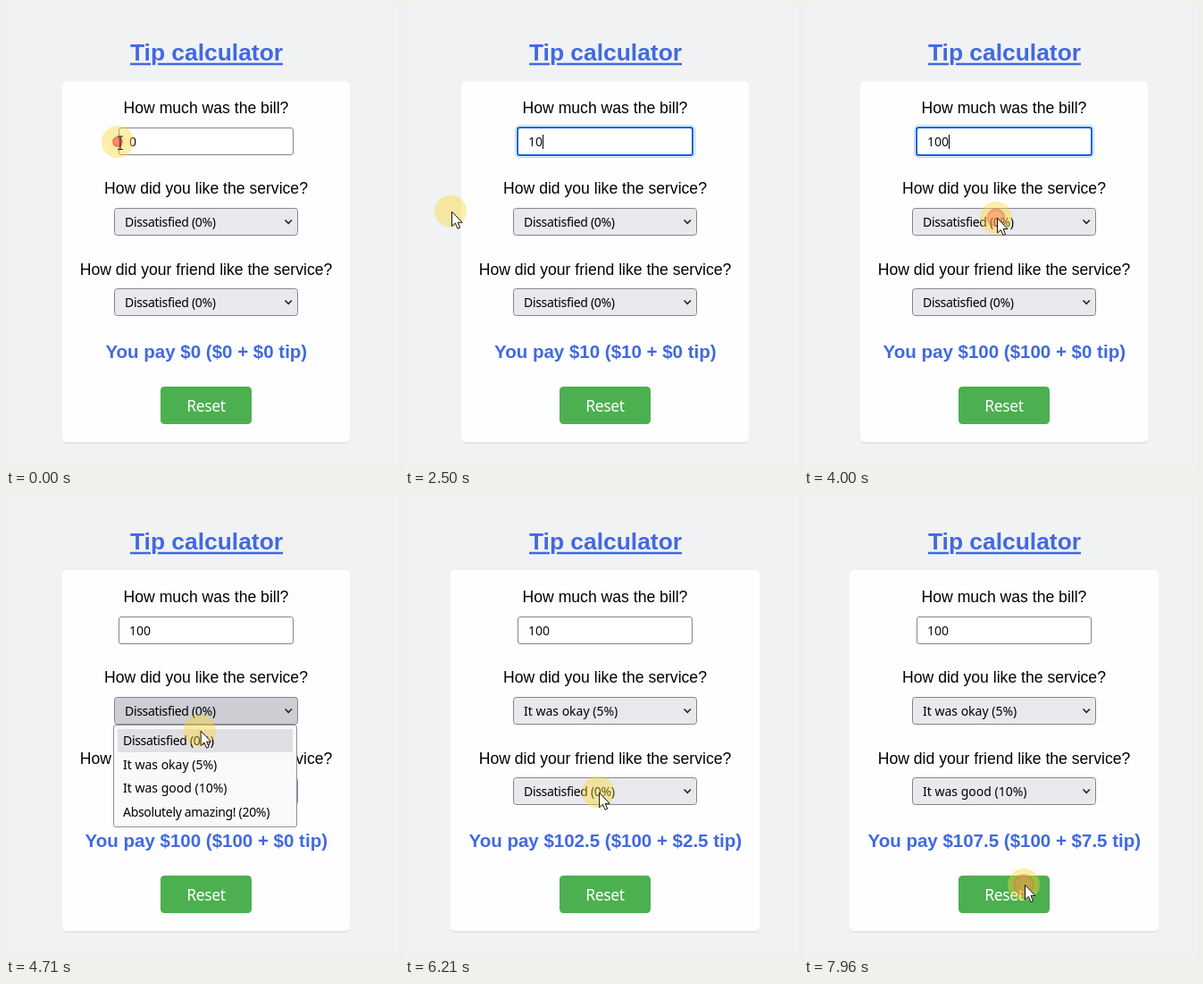
These frames come from a looping animation (440 px wide and 516 px high, 8000 ms). An HTML page:

```html
<!DOCTYPE html>
<html lang="en">
<head>
<meta charset="utf-8">
<title>Tip calculator</title>
<style>
  html, body { margin: 0; width: 100%; height: 100%; overflow: hidden; background: #f1f2f3; }
  svg { display: block; width: 440px; height: 516px; }
  text { white-space: pre; }
  .head { font: bold 26.4px "Liberation Sans", Arial, sans-serif; fill: #4169e1; text-anchor: middle; }
  .label { font: 17.6px "Liberation Sans", Arial, sans-serif; text-anchor: middle; }
  .total { font: bold 20.5px "Liberation Sans", Arial, sans-serif; fill: #4169e1; text-anchor: middle; }
  .ui { font: 14px "Noto Sans", "Open Sans", sans-serif; }
  .tight { letter-spacing: -.32px; }
  .btn { font-size: 17.5px; fill: #fff; text-anchor: middle; }
</style>
</head>
<body>
<svg id="stage" viewBox="0 0 440 516" xmlns="http://www.w3.org/2000/svg"></svg>
<script>
const LOOP = 8000;
const OPTIONS = [
  { text: "Dissatisfied (0%)", tip: 0, tight: true },
  { text: "It was okay (5%)", tip: 5 },
  { text: "It was good (10%)", tip: 10 },
  { text: "Absolutely amazing! (20%)", tip: 20, tight: true }
];
const ROW = 26.67;
const LAST_KEY = 2520;
const BLUR = 4060;
const CLICK_TIME = 180;
const BLUE = "#0060df", FACE = "#e9e9ed", PRESSED = "#cdcdd4", EDGE = "#84848e";

// Pointer stops: time, x, y
const PATH = [
  [0, 125, 152], [90, 125, 152], [880, 80, 151], [1090, 75, 149],
  [1850, 75, 149], [2200, 51, 215], [2740, 51, 240], [3090, 170, 387],
  [3250, 182, 380], [3800, 215, 237], [4420, 215, 237], [5090, 219, 303],
  [5560, 219, 303], [6300, 216, 334], [6850, 216, 334], [7000, 220, 422],
  [7480, 220, 422], [7800, 246, 436], [8000, 246, 436]
];
const CLICKS = [-20, 3925, 5175, 6450, 7260, 7870];
const MENUS = [
  { top: 226, open: 4080, close: 5400, pick: 1 },
  { top: 316, open: 6600, close: 7440, pick: 2 }
];
// Text areas that show the I-beam: left, top, right, bottom
const TEXT_AREAS = [
  [126, 136, 322, 167], [132, 105, 316, 124], [110, 195, 338, 214],
  [83, 286, 365, 305], [88, 376, 360, 398]
];

const stage = document.getElementById("stage");

function add(tag, attrs, parent = stage, text) {
  const el = document.createElementNS("http://www.w3.org/2000/svg", tag);
  set(el, attrs);
  if (text) el.textContent = text;
  parent.appendChild(el);
  return el;
}
function set(el, attrs) {
  for (const k in attrs) el.setAttribute(k, attrs[k]);
}
function show(el, on) {
  el.setAttribute("visibility", on ? "visible" : "hidden");
}
function box(x, y, width, height, rx, fill, stroke = "none", parent = stage) {
  return add("rect", { x, y, width, height, rx, fill, stroke }, parent);
}
function label(cls, x, y, text, parent = stage) {
  return add("text", { class: cls, x, y }, parent, text);
}
const optionClass = o => o.tight ? "ui tight" : "ui";

// Page
label("head", 224.5, 61, "Tip calculator");
add("path", { d: "M139 65H162M170 65H310", stroke: "#4169e1", "stroke-width": 2.6 });
const shadow = box(0, 85, 0, 405, 5, "rgba(40,40,60,.06)");
const card = box(0, 84, 0, 404, 5, "#fefefe");
label("label", 224, 120, "How much was the bill?");
label("label", 224, 210, "How did you like the service?");
label("label", 224, 301, "How did your friend like the service?");

// Bill field
const plain = box(126.5, 136.5, 195, 30, 2.5, "#fff", EDGE);
const focus = add("g", {});
box(123.5, 133.5, 201, 36, 5, "none", "#b0d2ee", focus);
set(box(126, 136, 196, 31, 2.5, "#fff", BLUE, focus), { "stroke-width": 2 });
const mark = box(138, 143, 8, 17, 0, "#0078d7");
const bill = label("ui", 138, 157, "0");
const caret = box(162, 144, 1, 16, 0, "#000");

// Service choices
const selects = MENUS.map(m => ({
  face: box(121.5, m.top + .5, 205, 30, 3, FACE, EDGE),
  text: label("ui", 133, m.top + 21, ""),
  arrow: add("path", {
    d: `M312.5 ${m.top + 13.5}l3.7 3.8l3.7 -3.8`,
    fill: "none", stroke: "#222", "stroke-width": 1.6
  })
}));

const total = label("total", 224.3, 394, "");
box(173, 426, 102, 42, 4.5, "#4caf50");
label("ui tight btn", 224, 454, "Reset");

const lists = MENUS.map((m, i) => {
  const g = add("g", {});
  const top = m.top + 31 + i;
  box(120.5, top + .5, 205, 114, 2.5, "#f9f9fb", "#8f8f9d", g);
  const row = box(125, 0, 196, 26, 0, "#dfdfe4", "none", g);
  OPTIONS.forEach((o, n) => label(optionClass(o), 131, top + 23 + n * ROW, o.text, g));
  return { g, row, top };
});

// Pointer
const pointer = add("g", {});
add("circle", { r: 18, fill: "rgba(250,215,50,.42)" }, pointer);
const ring = add("circle", { "stroke-width": 2 }, pointer);
const arrow = add("path", {
  d: "M1.5 .5V17L5.3 13.5L8 19.6L10.6 18.4L8 12.6H13Z",
  fill: "#fff", stroke: "#111", "stroke-width": 1
}, pointer);
const beam = add("path", {
  d: "M0 -6H2.5L3 -5.5L3.5 -6H6M3 -5.5V8M0 8.5H2.5L3 8L3.5 8.5H6",
  fill: "none", stroke: "#222", "stroke-width": 1.2
}, pointer);

function pointerAt(t) {
  let i = 1;
  while (i < PATH.length - 1 && PATH[i][0] < t) i++;
  const [t0, x0, y0] = PATH[i - 1], [t1, x1, y1] = PATH[i];
  const p = Math.min(1, Math.max(0, (t - t0) / (t1 - t0)));
  const e = p * p * (3 - 2 * p);
  return [x0 + (x1 - x0) * e, y0 + (y1 - y0) * e];
}

function typed(t) {
  if (t < 2160) return "0";
  if (t < 2340) return "1";
  return t < LAST_KEY ? "10" : "100";
}

function draw(t) {
  const amount = typed(t);
  const focused = t >= 90 && t < BLUR;
  const selected = t >= 170 && t < 2160;
  show(plain, !focused);
  show(focus, focused);
  show(mark, selected);
  bill.textContent = amount;
  bill.setAttribute("fill", selected ? "#fff" : "#111");
  const since = t - (t < LAST_KEY ? 2160 : LAST_KEY);
  show(caret, focused && since >= 0 && since % 1000 < 500);
  caret.setAttribute("x", 138 + 8 * amount.length);

  let percent = 0;
  let menuOpen = false;
  MENUS.forEach((m, i) => {
    const open = t >= m.open && t < m.close;
    const option = OPTIONS[t >= m.close ? m.pick : 0];
    const { face, text } = selects[i];
    const list = lists[i];
    percent += option.tip / 2;
    menuOpen = menuOpen || open;
    face.setAttribute("fill", open ? PRESSED : FACE);
    text.textContent = option.text;
    text.setAttribute("class", optionClass(option));
    show(list.g, open);
    // The highlight trails the pointer a little
    const over = Math.floor((pointerAt(t - 80)[1] - list.top - 5) / ROW);
    const n = Math.min(3, Math.max(0, over));
    list.row.setAttribute("y", Math.round(list.top + 5 + n * ROW));
  });

  const tip = amount * percent / 100;
  total.textContent = `You pay $${+amount + tip} ($${amount} + $${tip} tip)`;
  const wide = tip > 0;
  const frame = { x: wide ? 51 : 63, width: wide ? 346 : 322 };
  set(card, frame);
  set(shadow, frame);

  const [x, y] = pointerAt(t);
  pointer.setAttribute("transform", `translate(${x.toFixed(2)} ${y.toFixed(2)})`);
  const overText = TEXT_AREAS.some(([l, a, r, b]) => x >= l && x <= r && y >= a && y <= b);
  const isBeam = t < 1340 || (overText && !menuOpen);
  show(beam, isBeam);
  show(arrow, !isBeam);

  const start = CLICKS.find(c => t >= c && t < c + CLICK_TIME);
  show(ring, start !== undefined);
  if (start !== undefined) {
    const p = (t - start) / CLICK_TIME;
    set(ring, {
      r: 3.5 + 14.5 * p,
      fill: `rgba(255,${Math.round(80 + 80 * p)},70,${(.75 * (1 - p)).toFixed(3)})`,
      stroke: `rgba(240,80,60,${(.6 * (1 - p)).toFixed(3)})`
    });
  }
}

function tick() {
  draw(performance.now() % LOOP);
  requestAnimationFrame(tick);
}
tick();
</script>
</body>
</html>
```
